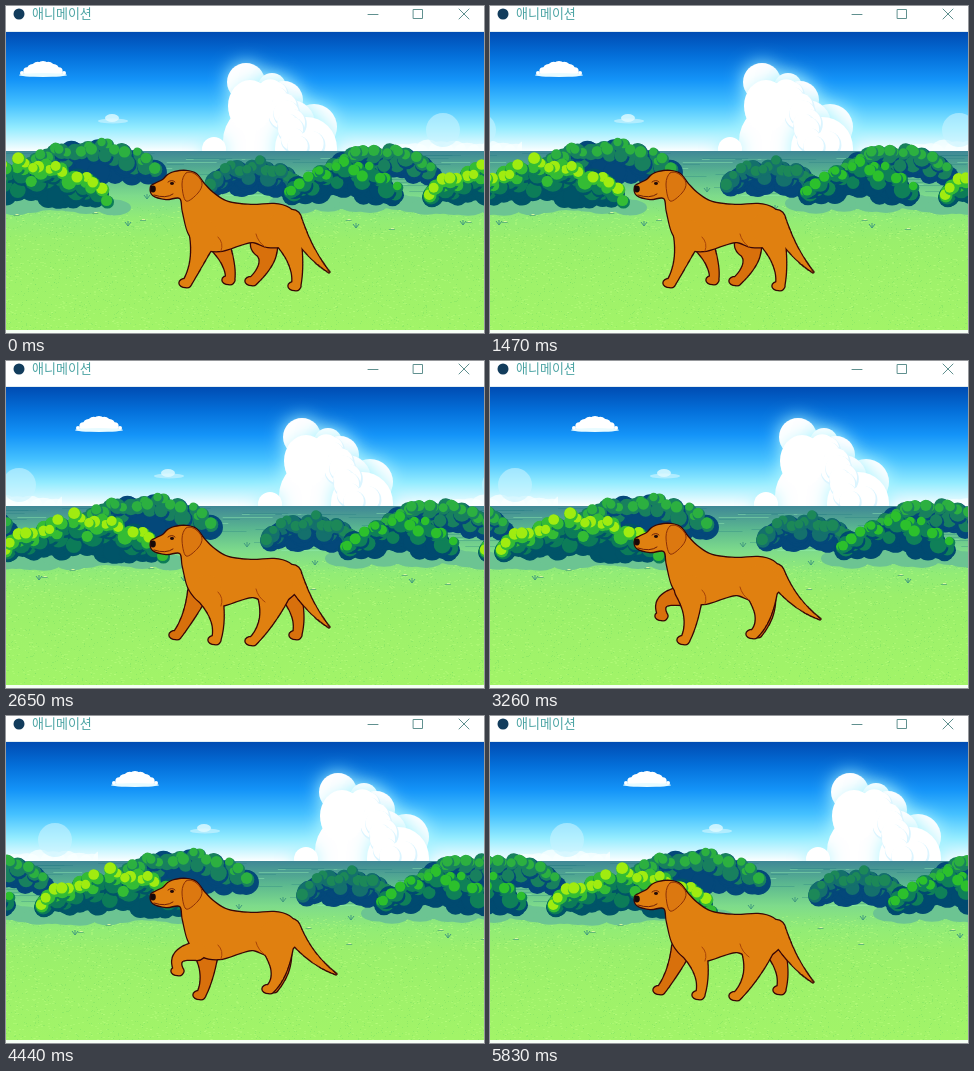
Recreate the animation shown at these times as an HTML page with a canvas. Size 478x327 px, loop 5.91 s.

```html
<!DOCTYPE html>
<html lang="ko">
<head>
<meta charset="utf-8">
<style>
html, body { margin: 0; width: 100%; height: 100%; overflow: hidden; background: #fff; }
canvas { position: absolute; left: 0; top: 0; }
#title { position: absolute; left: 26px; top: -1px; font: 300 13px/16px "Noto Sans CJK KR", "Noto Sans CJK", sans-serif; color: #4ca4a4; white-space: nowrap; }
</style>
</head>
<body>
<canvas id="stage" width="478" height="327"></canvas>
<div id="title">애니메이션</div>
<script>
const LOOP = 5910, PERIOD = 480, HORIZON = 145;
const STEPS = 30, SHIFT = 4, FIRST = 66, TICK = 77.8;
const stage = document.getElementById('stage').getContext('2d');
const scenery = document.createElement('canvas');
scenery.width = PERIOD;
scenery.height = 327;
let g = scenery.getContext('2d');

let seed = 1;
const rnd = () => (seed = seed * 16807 % 2147483647) / 2147483647;
const mix = (a, b, s) => a + (b - a) * s;

function gradient(y0, y1, colors) {
  const fill = g.createLinearGradient(0, y0, 0, y1);
  colors.forEach((color, i) => fill.addColorStop(i / (colors.length - 1), color));
  return fill;
}
function box(x, y, w, h, color) {
  g.fillStyle = color;
  g.fillRect(x, y, w, h);
}
function oval(x, y, rx, ry, color) {
  g.fillStyle = color;
  g.beginPath();
  g.ellipse(x, y, rx, ry, 0, 0, 7);
  g.fill();
}
// Disc with a crescent of shade at its lower right
function lump(x, y, r, color, shade) {
  oval(x, y, r, r, shade);
  oval(x - .8, y - 1.5, r - 1, r - 1, color);
}

function clouds() {
  g.beginPath();
  g.rect(0, 26, PERIOD, HORIZON - 26);
  g.clip();
  for (let x = 396; x < 520; x += 13) oval(x, 143, 12, 5 + rnd() * 6, 'rgba(250,255,255,.7)');
  oval(437, 124, 17, 17, 'rgba(200,244,255,.6)');

  // Tall cloud: a head, a slope falling to the right and a wide foot
  g.shadowColor = '#a8f4ff';
  g.shadowBlur = 18;
  for (const [x, y, r] of [[240,76,19], [266,81,14], [278,94,19], [250,104,27], [308,121,23],
    [285,118,24], [255,135,38], [300,142,31], [208,143,12]]) oval(x, y, r, r, '#fff');
  g.shadowBlur = 0;
  for (let i = 0; i < 12; i++) {
    const s = i / 11;
    lump(mix(265, 318, s) - rnd() * 34 * s, mix(84, 136, s) + rnd() * 8, 11 + rnd() * 4, '#fff', '#dcf5ff');
  }
  oval(244, 100, 22, 26, '#fff');

  for (let i = 0; i < 9; i++) {
    const s = i / 8, r = 2 + 5 * Math.sin(Math.PI * s);
    oval(mix(16, 58, s), 69 - r, r, r, '#fff');
  }
  oval(37, 69, 24, 2, '#e8fbff');
  oval(107, 115, 15, 2.5, 'rgba(190,240,255,.8)');
  oval(106, 112, 7, 4, 'rgba(225,250,255,.8)');
}

function meadow() {
  for (let i = 0; i < 70; i++)
    box(rnd() * 440, mix(147, 192, rnd()) | 0, mix(12, 50, rnd()), 1, i % 3 ? 'rgba(30,120,125,.28)' : 'rgba(150,240,180,.4)');
  for (let i = 0; i < 3600; i++)
    box(rnd() * 480 | 0, mix(200, 324, rnd()) | 0, 1 + i % 2, 1, i % 2 ? 'rgba(190,255,130,.35)' : 'rgba(95,205,95,.25)');
  for (const [from, to, y] of [[-60, 108, 196], [280, 412, 194]])
    for (let x = from; x <= to; x += 14) oval(x, y + rnd() * 6, 17, 8, '#6cc492');
  g.strokeStyle = '#429a80';
  g.lineWidth = 1;
  for (const [x, y] of [[185,184], [253,202], [350,220], [122,218], [457,217], [141,191]]) {
    g.beginPath();
    g.moveTo(x - 3, y - 2); g.lineTo(x, y + 2); g.lineTo(x, y - 3);
    g.moveTo(x, y + 2); g.lineTo(x + 3, y - 2);
    g.stroke();
  }
  for (let i = 0; i < 8; i++) {
    const x = i * 60 + rnd() * 40, y = mix(205, 231, rnd());
    box(x, y | 0, 6, 1, '#62b878');
    box(x + 2, (y | 0) - 1, 3, 1, '#d8f8a0');
  }
}

// Leaves pile up in layers, from large dark ones at the foot to small light ones on top
function bush(left, right, top, foot, colors) {
  const last = colors.length - 1;
  colors.forEach((color, k) => {
    const r0 = mix(11, 6, k / last), count = (right - left) / (5 + 1.5 * k);
    for (let i = 0; i < count; i++) {
      const u = (i * .618 + rnd() * .03) % 1, r = r0 * mix(.85, 1.15, rnd());
      const v = mix(.65 * k / last, 1 - .1 * (last - k), rnd());
      const rise = v * Math.sin(Math.PI * u) ** .5 * (foot - top - 2 * r);
      lump(mix(left + r, right - r, u), foot - r - rise, r, color, colors[Math.max(0, k - 1)]);
    }
  });
}

function bushes() {
  const far = ['#04487a', '#18805e', '#2cb040'];
  bush(8, 162, 128, 181, far);
  bush(313, 437, 134, 181, far);
  bush(197, 300, 149, 192, ['#04487a', '#14706c', '#1c8858']);
  bush(276, 402, 150, 201, ['#004a70', '#0f8058', '#2cc02c']);
  bush(-64, 108, 146, 203, ['#005468', '#0c7c58', '#34bc34', '#a0ec10']);
}

function paintScenery() {
  box(0, 26, PERIOD, 120, gradient(26, 146, ['#004cb2', '#0470da', '#1494f8', '#44c0ff', '#94ecff', '#fff']));
  box(0, HORIZON, PERIOD, 179, gradient(HORIZON, 324,
    ['#3f8796', '#5ab690', '#7edb8b', '#92ec76', '#9aef6c', '#9cf16a', '#9ff26a', '#a0f369', '#a2f468']));
  for (const layer of [clouds, meadow, bushes]) {
    const start = seed;
    for (const x of [-PERIOD, 0, PERIOD]) {
      seed = start;
      g.save();
      g.translate(x, 0);
      layer();
      g.restore();
    }
  }
}

// Closed smooth curve through points
function outline(pts) {
  const path = new Path2D(), at = i => pts[(i + pts.length) % pts.length];
  path.moveTo(...at(0));
  pts.forEach((b, i) => {
    const a = at(i - 1), c = at(i + 1), d = at(i + 2);
    path.bezierCurveTo(b[0] + (c[0] - a[0]) / 6, b[1] + (c[1] - a[1]) / 6,
      c[0] - (d[0] - b[0]) / 6, c[1] - (d[1] - b[1]) / 6, ...c);
  });
  path.closePath();
  return path;
}
// Tapering tube bent through three joints
function limb(a, b, c, r0, r1, power) {
  const path = new Path2D();
  const along = (s, k) => {
    const bend = 2 * b[k] - (a[k] + c[k]) / 2;
    return mix(mix(a[k], bend, s), mix(bend, c[k], s), s);
  };
  for (let i = 0; i <= 40; i++) {
    const s = i / 40, x = along(s, 0), y = along(s, 1), r = mix(r1, r0, (1 - s) ** power);
    path.moveTo(x + r, y);
    path.arc(x, y, r, 0, 7);
  }
  return path;
}
function leg(hip, knee, foot, r) {
  const path = limb(hip, knee, foot, r, 4.2, 2);
  path.moveTo(foot[0] + 4.5, foot[1]);
  path.ellipse(foot[0] - 1.5, foot[1], 6, 4, 0, 0, 7);
  return path;
}

const body = outline([[145,181], [149,178], [157,174], [162,169], [169,166], [180,165], [190,168],
  [198,178], [207,187], [222,196], [245,199], [268,198], [283,202], [291,212], [293,226], [280,239],
  [262,241], [247,236], [234,239], [214,245], [196,242], [183,228], [177,206], [174,192], [160,193], [147,189]]);
const ear = outline([[180,167], [176,178], [180,195], [192,187], [196,177], [189,168]]);
const tailLow = limb([286,213], [303,243], [323,266], 9, .4, 1);
const tailHigh = limb([285,212], [305,239], [330,258], 9, .4, 1);

const reach = {
  tail: tailLow, dy: 0,
  far: [leg([212,236], [222,257], [224,274], 10), leg([258,238], [260,256], [247,275], 13)],
  near: [leg([198,228], [191,255], [181,277], 14), leg([277,222], [289,254], [290,280], 16)]
};
const cross = {
  tail: tailLow, dy: 0,
  far: [leg([192,232], [182,256], [171,274], 10), leg([286,236], [292,256], [291,274], 9)],
  near: [leg([201,228], [211,256], [210,279], 14), leg([268,224], [262,256], [247,280], 19)]
};
const lifted = leg([191,235], [173,241], [173,255], 9);
const planted = leg([199,228], [201,256], [195,279], 14);
const hindNear = leg([270,222], [273,253], [264,273], 18);
const hindFar = leg([276,236], [277,254], [268,272], 9);
const passNear = { tail: tailHigh, dy: -2, far: [lifted, hindFar], near: [planted, hindNear] };
const passFar = { ...passNear, far: [planted, hindFar], near: [lifted, hindNear] };
const poses = [reach, passNear, cross, passFar];

function arc(x0, y0, cx, cy, x1, y1, color) {
  g.strokeStyle = color;
  g.beginPath();
  g.moveTo(x0, y0);
  g.quadraticCurveTo(cx, cy, x1, y1);
  g.stroke();
}
// Outlining everything before filling merges the parts into one silhouette
function silhouette(parts, color) {
  g.strokeStyle = '#380606';
  g.lineWidth = 2.6;
  parts.forEach(p => g.stroke(p));
  g.fillStyle = color;
  parts.forEach(p => g.fill(p));
}
function dog({ tail, dy, far, near }) {
  const torso = new Path2D();
  torso.addPath(body, new DOMMatrix([1, 0, 0, 1, 0, dy]));
  g.lineJoin = g.lineCap = 'round';
  silhouette(far, '#d8700c');
  silhouette([tail, torso, ...near], '#e08010');
  g.save();
  g.translate(0, dy);
  g.lineWidth = 1;
  arc(212, 231, 218, 237, 215, 245, '#a84408');
  arc(250, 228, 252, 236, 259, 241, '#a84408');
  g.fillStyle = '#dc7810';
  g.fill(ear);
  g.strokeStyle = '#8c3008';
  g.stroke(ear);
  arc(148, 189, 160, 193, 167, 188, '#702008');
  arc(162, 176, 166, 173, 169, 176, '#702008');
  oval(147, 183, 2.8, 3.4, '#180808');
  oval(166, 177.5, 2, 1.4, '#200808');
  g.restore();
}

function windowFrame() {
  box(0, 0, 478, 26, '#fff');
  box(0, 25, 478, 1, '#e2eef2');
  box(0, 324, 478, 3, '#f5fff4');
  oval(13, 8, 5.5, 5.5, '#123c5c');
  g.strokeStyle = '#60908f';
  g.lineWidth = 1;
  g.strokeRect(407.5, 3.5, 9, 9);
  g.beginPath();
  g.moveTo(362, 8.5); g.lineTo(372, 8.5);
  g.moveTo(453, 3); g.lineTo(463, 13);
  g.moveTo(463, 3); g.lineTo(453, 13);
  g.stroke();
}

// Steps come at an even pace, rounded to whole ticks
const stepTime = n => FIRST + TICK * Math.round(2.56 * n);

function draw() {
  const t = performance.now() % LOOP;
  let count = 0;
  while (count < STEPS && stepTime(count) <= t) count++;
  const x = count * SHIFT;
  g.drawImage(scenery, x, 0);
  g.drawImage(scenery, x - PERIOD, 0);
  dog(poses[count % 4]);
  windowFrame();
  requestAnimationFrame(draw);
}

paintScenery();
g = stage;
draw();
</script>
</body>
</html>
```
